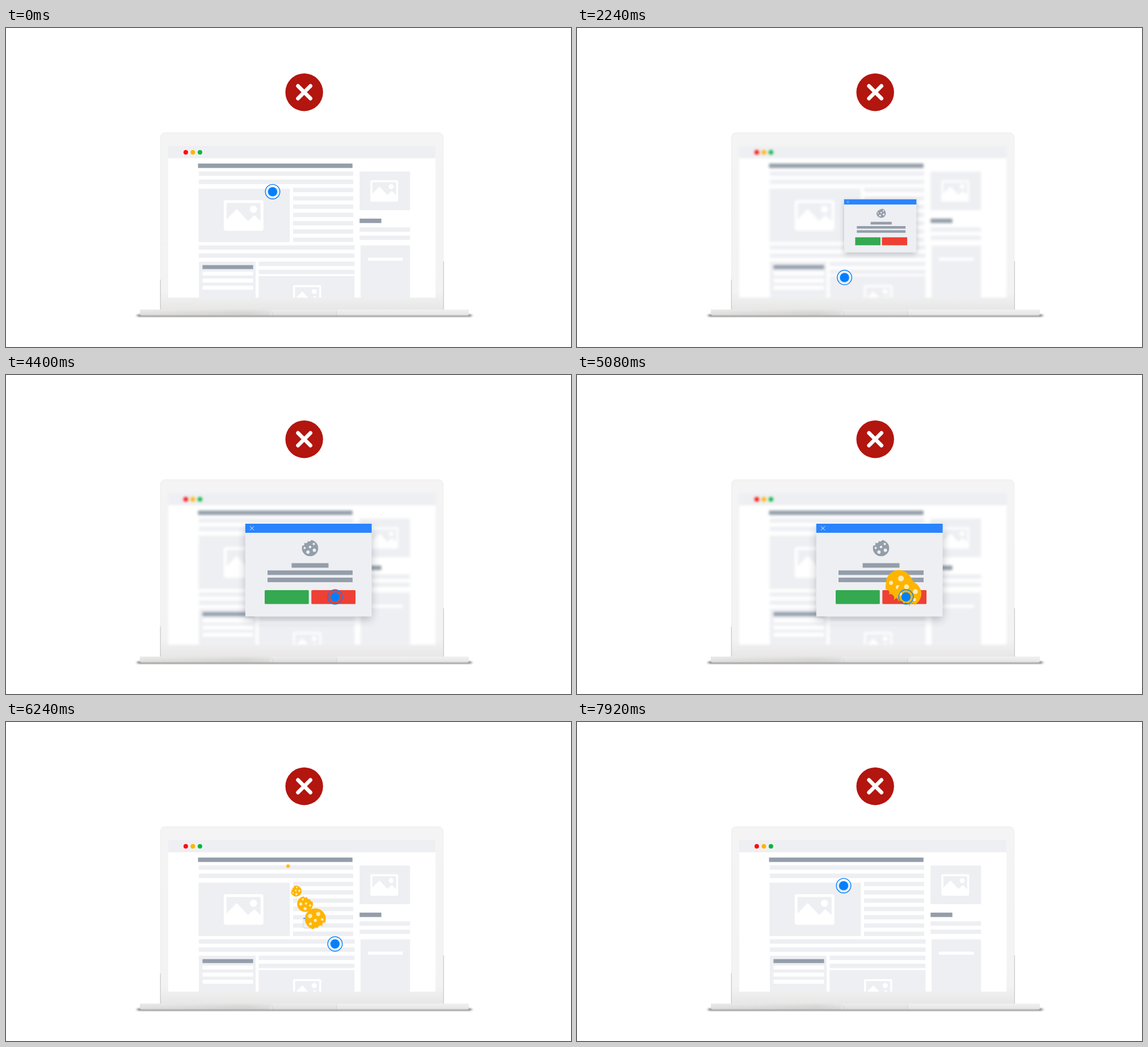
Animation, 996 px wide and 562 px high, one loop 8440 ms. Source, as an HTML page:

```html
<!DOCTYPE html>
<html lang="en">
<head>
<meta charset="utf-8">
<title>Cookie banner</title>
<style>
  html, body { margin: 0; width: 100%; height: 100%; overflow: hidden; background: #fff; }
  svg { display: block; width: 100vw; height: 100vh; }
</style>
</head>
<body>
<svg viewBox="0 0 996 562">
  <defs>
    <linearGradient id="lid" x2="0" y2="1">
      <stop offset="0" stop-color="#f4f4f4"/><stop offset=".9" stop-color="#f3f3f3"/>
      <stop offset="1" stop-color="#e7e7e7"/>
    </linearGradient>
    <linearGradient id="baseLeft">
      <stop offset="0" stop-color="#e2e1e0"/><stop offset=".8" stop-color="#d5d4d2"/>
      <stop offset="1" stop-color="#dedddc"/>
    </linearGradient>
    <linearGradient id="edge" x2="0" y2="1">
      <stop offset="0" stop-color="#fff" stop-opacity=".35"/><stop offset=".6" stop-color="#fff" stop-opacity="0"/>
      <stop offset="1" stop-color="#777" stop-opacity=".35"/>
    </linearGradient>
    <filter id="soft" x="-5%" y="-200%" width="110%" height="500%"><feGaussianBlur stdDeviation="2 1.2"/></filter>
    <filter id="shade" x="-20%" y="-20%" width="140%" height="150%"><feGaussianBlur stdDeviation="8"/></filter>
    <filter id="blur" filterUnits="userSpaceOnUse" x="270" y="195" width="503" height="295" color-interpolation-filters="sRGB">
      <feGaussianBlur stdDeviation="0"/>
    </filter>
    <clipPath id="screen"><rect x="286" y="208" width="471.5" height="267"/></clipPath>
    <mask id="bite" maskUnits="userSpaceOnUse" x="-1.1" y="-1.1" width="2.2" height="2.2">
      <circle r="1" fill="#fff"/>
      <circle cx="-.88" cy="-.5" r=".2"/><circle cx="-.54" cy="-.87" r=".27"/><circle cx="-.1" cy="-1.03" r=".22"/>
    </mask>
    <g id="cookie">
      <circle r="1" fill="currentColor" mask="url(#bite)"/>
      <g style="fill:var(--chip)">
        <circle cx="-.65" cy="-.02" r=".13"/><circle cx="0" cy="-.14" r=".15"/><circle cx=".45" cy="-.5" r=".14"/>
        <circle cx=".52" cy=".25" r=".2"/><circle cx="-.25" cy=".48" r=".2"/>
      </g>
    </g>
    <g id="photo" fill="#fff">
      <path fill-rule="evenodd" d="M4 0H66Q70 0 70 4V50Q70 54 66 54H4Q0 54 0 50V4Q0 0 4 0ZM5 5V34L22 16.5Q23 15.5 24 16.5L43 37 53 27.5Q54 27 55 27.5L65 37V5Z"/>
      <circle cx="52.5" cy="16" r="6.3"/>
    </g>
  </defs>

  <rect width="996" height="562" fill="#fff"/>
  <circle cx="525.7" cy="113.2" r="33.2" fill="#b3150f"/>
  <path d="M514.7 102.2l22 22m0-22l-22 22" stroke="#fff" stroke-width="6.8" stroke-linecap="round"/>

  <!-- laptop -->
  <rect x="231" y="504" width="590" height="5" rx="2.5" fill="#555" opacity=".6" filter="url(#soft)"/>
  <path d="M272 496V194Q272 184 282 184H761Q771 184 771 194V496Z" fill="url(#lid)"/>
  <path d="M272.2 443V496M771.3 411V496" stroke="#bcbcbc"/>
  <path d="M272.3 442V194Q272.3 184.4 282 184.4H761Q770.7 184.4 770.7 194V411" fill="none" stroke="#ebebeb" stroke-width=".8"/>
  <path d="M236 496H470V507H240Q236 507 236 503Z" fill="url(#baseLeft)"/>
  <path d="M583 496H816V503Q816 507 812 507H583Z" fill="#e9e9e9"/>
  <path d="M465 496H583V507H465Z" fill="#e4e3e3"/>
  <path d="M465 497Q470 498 471 507M583 497V507" fill="none" stroke="#cfcfcf" stroke-width=".8"/>
  <path d="M236 496H816V503Q816 507 812 507H240Q236 507 236 503Z" fill="url(#edge)"/>

  <g id="pageBlur"><g id="page" clip-path="url(#screen)">
    <rect x="286" y="208" width="471.5" height="267" fill="#fff"/>
    <circle cx="316.9" cy="219" r="4" fill="#ff0a0a"/>
    <circle cx="329.4" cy="219" r="4" fill="#ffb400"/>
    <circle cx="341.9" cy="219" r="4" fill="#0ab540"/>
  </g></g>

  <g id="popup">
    <rect x="423" y="270" width="221" height="160" fill="#222b3a" opacity=".3" filter="url(#shade)"/>
    <rect x="421.8" y="262" width="222.8" height="163.5" fill="#eeeff3"/>
    <rect x="421.8" y="262" width="222.8" height="16" fill="#2a84ff"/>
    <path d="M430 266.5l7 7m0-7l-7 7" stroke="#fff" stroke-width=".9"/>
    <g id="content">
      <use href="#cookie" transform="translate(536 305) scale(14.6)" style="color:#949eaa;--chip:#eeeff3"/>
      <path d="M503.5 331.5h65v8h-65zM461 344.3h150v8H461zM461 357h150v8H461z" fill="#949eaa"/>
      <rect x="456" y="379" width="77.8" height="24.6" rx="1.5" fill="#34a950"/>
      <rect x="538.3" y="379" width="77.8" height="24.6" rx="1.5" fill="#ee4034"/>
    </g>
  </g>
  <g id="cookies" style="color:#ffb400;--chip:#fdebb9"></g>
  <g id="cursor" fill="none">
    <circle r="12.8" stroke="#0080ff" stroke-width="1.4"/><circle r="8.2" fill="#0080ff"/>
  </g>
</svg>
<script>
const LOOP = 8440, STEP = 40;
const $ = id => document.getElementById(id);
const make = (parent, tag, attrs) => {
  const el = document.createElementNS('http://www.w3.org/2000/svg', tag);
  for (const key in attrs) el.setAttribute(key, attrs[key]);
  return parent.appendChild(el);
};

// Page layout
const LIGHT = '#eeeff3', DARK = '#949eaa';
const box = (x, y, width, height, fill = LIGHT) => make($('page'), 'rect', { x, y, width, height, fill });
const lines = (x, y, width, count, gap, fill, height = 7.8) => {
  for (let i = 0; i < count; i++) box(x, y + i * gap, width, height, fill);
};
const photo = (x, y, scale) =>
  make($('page'), 'use', { href: '#photo', transform: `translate(${x} ${y}) scale(${scale})` });

$('page').insertBefore(box(286, 208, 471.5, 21.5), $('page').children[1]);
box(338.5, 238.8, 272.3, 7.8, DARK);
lines(340, 252.5, 272, 2, 14.6);
box(339.3, 283.2, 161, 94);
photo(383.8, 303.2, 1);
lines(506, 281.6, 106, 7, 14.6);
lines(340, 382.8, 274.5, 2, 14.3);
box(340, 411.6, 100, 64);
box(346.4, 417.7, 89.2, 7, DARK);
lines(346.4, 429, 89.2, 3, 12.5, '#fff', 7);
lines(445.4, 411.6, 169, 2, 14.2);
box(445.4, 437, 169, 38);
photo(506, 453, .71);
box(623.3, 252.8, 89, 68.2);
photo(642.3, 268.3, .7);
box(623.3, 335.8, 38.4, 7.8, DARK);
lines(623.3, 351.2, 89, 2, 14.4);
box(625, 383, 87.3, 92);
box(638, 404.6, 61.3, 5.4, '#fff');

// Motion helpers
const clamp = v => Math.min(1, Math.max(0, v));
const cubic = (a, b, c, d, s) =>
  a * (1 - s) ** 3 + 3 * b * s * (1 - s) ** 2 + 3 * c * s * s * (1 - s) + d * s ** 3;
const ease = (p, x1 = .38, x2 = .36) => {
  let lo = 0, hi = 1;
  for (let i = 0; i < 24; i++) {
    const mid = (lo + hi) / 2;
    if (cubic(0, x1, x2, 1, mid) < p) lo = mid; else hi = mid;
  }
  return cubic(0, 0, 1, 1, lo);
};
const ramp = (t, start, length) => ease(clamp((t - start) / length));
const between = (a, b, p) => a + (b - a) * p;

function cursorAt(t) {
  if (t < 2420) {
    const p = ramp(t, 0, 2420);
    return [between(470, 471.6, p), between(288.4, 440.3, p)];
  }
  if (t < 7000) {
    const p = ramp(t, 2420, 1580);
    return [cubic(471.6, 490, 567.5, 580, p), cubic(440.3, 458, 431, 391, p)];
  }
  if (t < 7920) {
    const p = ramp(t, 7000, 1160);
    return [between(580, 470, p), between(391, 286, p)];
  }
  return [470, 288.4];
}

// Cookie trail: progress, x, y, radius, angle
const TRAIL = [
  [0, 587, 383, 31, 225], [.19, 557, 366, 21.5, 270], [.357, 537, 333, 16.5, 120],
  [.583, 513.5, 304, 10.5, -15], [.748, 504, 275, 7, -95], [.913, 494, 255, 3.4, -160],
  [1, 489, 242, 0, -200]
];
const COOKIES = [
  { start: 4840, life: 1540, drift: 11 }, { start: 4820, life: 2300, drift: 0 },
  { start: 5200, life: 2300, drift: 0 }, { start: 5580, life: 2300, drift: 0 }
];
const GROW = 420;
for (const c of COOKIES) c.el = make($('cookies'), 'use', { href: '#cookie' });

function trailAt(p) {
  const i = Math.max(1, TRAIL.findIndex(k => k[0] >= p));
  const a = TRAIL[i - 1], b = TRAIL[i], q = (p - a[0]) / (b[0] - a[0]);
  return a.slice(1).map((v, n) => between(v, b[n + 1], q));
}

function drawCookie({ el, start, life, drift }, t) {
  const p = clamp((t - start) / life), grow = clamp((t - start + GROW) / GROW);
  const visible = grow > 0 && p < 1;
  el.style.display = visible ? '' : 'none';
  if (!visible) return;
  let [x, y, r, angle] = trailAt(p);
  const bend = Math.sin(Math.PI * p);
  x = between(580, x, grow) + drift * bend;
  y = between(391, y, grow) - drift * .45 * bend;
  el.setAttribute('transform', `translate(${x} ${y}) rotate(${angle}) scale(${r * grow})`);
}

function draw(t) {
  const blur = 2.3 * (ramp(t, 1700, 760) - ramp(t, 5720, 780));
  document.querySelector('#blur feGaussianBlur').setAttribute('stdDeviation', Math.max(0, blur));
  if (blur > .02) $('pageBlur').setAttribute('filter', 'url(#blur)');
  else $('pageBlur').removeAttribute('filter');

  const scale = ramp(t, 1880, 820) - ramp(t, 5720, 760);
  $('popup').style.display = scale > .002 ? '' : 'none';
  $('popup').setAttribute('transform', `translate(536.5 355) scale(${scale}) translate(-536.5 -355)`);
  $('content').setAttribute('opacity', 1 - ramp(t, 5260, 300));

  for (const c of COOKIES) drawCookie(c, t);
  $('cursor').setAttribute('transform', `translate(${cursorAt(t)})`);
}

const origin = performance.now();
function tick() {
  const t = (performance.now() - origin) % LOOP;
  draw(Math.floor(t / STEP) * STEP);
  requestAnimationFrame(tick);
}
tick();
</script>
</body>
</html>
```
